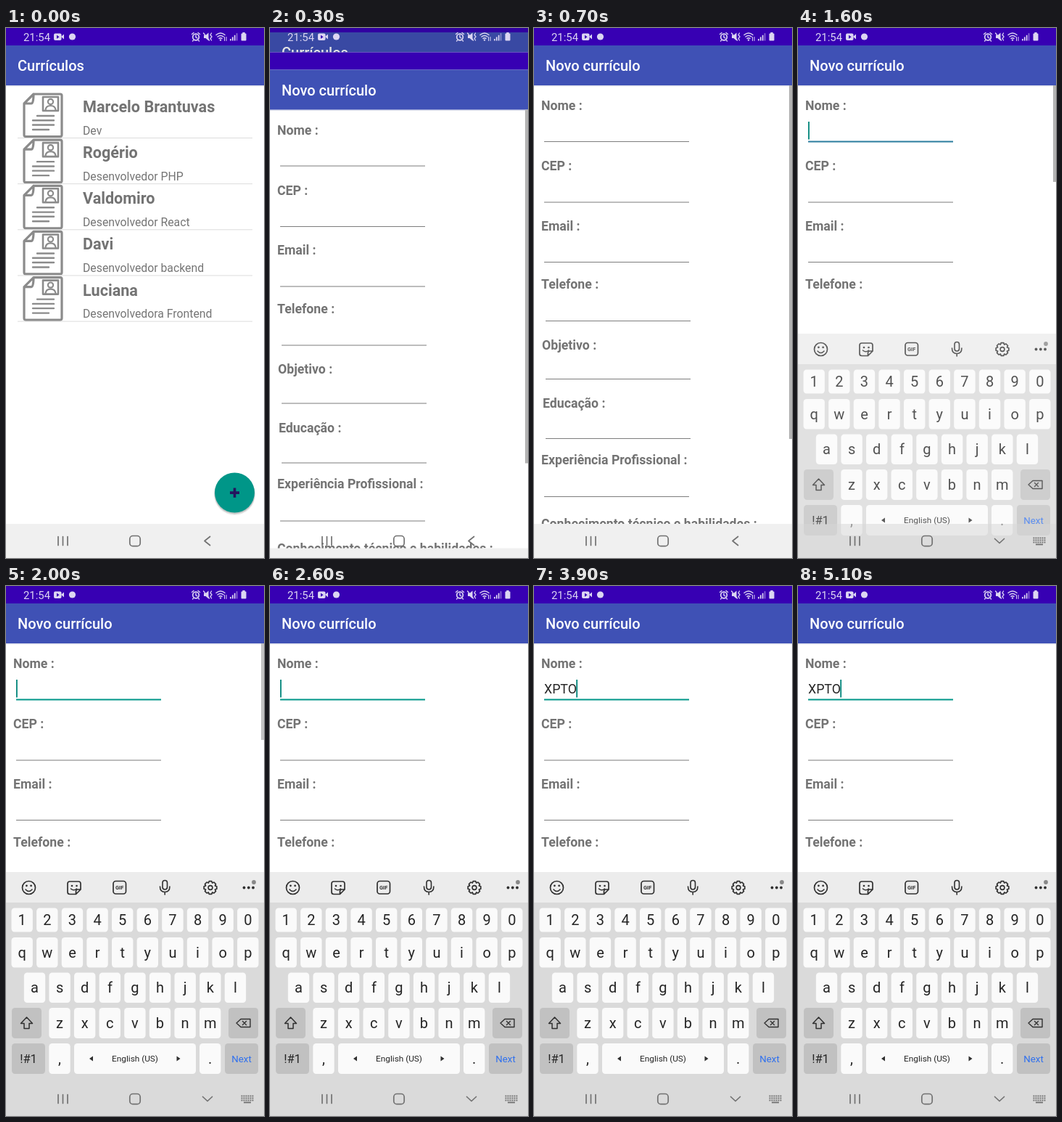
Recreate the animation shown at these times as an HTML page. Size 356 px wide and 730 px high, loop 5.3 s.

```html
<!DOCTYPE html>
<html lang="pt-BR">
<head>
<meta charset="utf-8">
<title>Currículos</title>
<style>
  html, body { margin: 0; width: 100%; height: 100%; overflow: hidden; background: #fff; }
  svg { display: block; font-family: Roboto, sans-serif; }
  .title { font-size: 20px; font-weight: 500; fill: #fff; }
  .name { font-size: 21.6px; font-weight: 700; fill: #737373; }
  .role { font-size: 15.8px; fill: #757575; }
  .label { font-size: 17.7px; font-weight: 700; fill: #737373; }
  .key { font-size: 20px; fill: #252525; text-anchor: middle; }
  .line { fill: none; stroke-linecap: round; stroke-linejoin: round; }
</style>
</head>
<body>
<svg id="stage" width="356" height="730" viewBox="0 0 356 730"></svg>
<script>
const LOOP = 5300;
const people = [
  ['Marcelo Brantuvas', 'Dev'],
  ['Rogério', 'Desenvolvedor PHP'],
  ['Valdomiro', 'Desenvolvedor React'],
  ['Davi', 'Desenvolvedor backend'],
  ['Luciana', 'Desenvolvedora Frontend']
];
// label, text x, baseline, underline x, underline y
const fields = [
  ['Nome :', 10, 113, 14, 156.5],
  ['CEP :', 10, 196, 14, 240],
  ['Email :', 10, 278.5, 14, 322.5],
  ['Telefone :', 10, 359, 16, 403.5],
  ['Objetivo :', 11, 442.5, 16, 483.5],
  ['Educação :', 12, 523, 16, 565.5],
  ['Experiência Profissional :', 10, 600.5, 14, 645.5],
  ['Conhecimento técnico e habilidades :', 10, 689, 14, 730]
];

const rect = (x, y, w, h, fill, r = 0, more = '') =>
  `<rect x="${x}" y="${y}" width="${w}" height="${h}" fill="${fill}" rx="${r}" ${more}/>`;
const text = (x, y, cls, s, more = '') => `<text x="${x}" y="${y}" class="${cls}" ${more}>${s}</text>`;
const line = (d, color, width) => `<path class="line" d="${d}" stroke="${color}" stroke-width="${width}"/>`;
const shape = (d, fill) => `<path d="${d}" fill="${fill}"/>`;
const dot = (x, y, r, fill) => `<circle cx="${x}" cy="${y}" r="${r}" fill="${fill}"/>`;
const ring = (x, y, r, color, width) =>
  `<circle cx="${x}" cy="${y}" r="${r}" fill="none" stroke="${color}" stroke-width="${width}"/>`;
const group = (id, s, more = '') => `<g id="${id}" ${more}>${s}</g>`;

const page = title =>
  rect(0, 0, 356, 770, '#fff') + rect(0, 79, 356, 1.5, '#dfe1ec') +
  rect(0, 0, 356, 24, '#3700b3') + rect(0, 24, 356, 55, '#3f51b5') +
  text(16, 59, 'title', title);
const navBack = rect(0, 683, 356, 90, '#f0f0f0');

const resume =
  line('M38 91H75Q77 91 77 93V147Q77 149.5 75 149.5H27Q25 149.5 25 147V104L38 91Q38 104 35 104H25', '#8b8b8b', 3.2) +
  line('M51 95H72V114H51Z', '#8b8b8b', 2.6) + ring(61.5, 101.5, 3.6, '#8b8b8b', 2.2) +
  line('M54.5 113Q55 107 61.5 107T68.5 113', '#8b8b8b', 2.2) +
  line('M43 121H66M37 127.3H66M37 133.5H66M37 140H59', '#8b8b8b', 2.4);

function listPage() {
  const rows = people.map(([name, role], i) =>
    `<g transform="translate(0 ${i * 63.15})">` + resume + text(106, 116, 'name', name) +
    text(106, 146.8, 'role', role) + rect(16, 151, 324, 1, '#dcdcdc') + '</g>').join('');
  const fab = dot(315.5, 642.5, 28.5, 'rgba(0,0,0,.08)') + dot(315.5, 641.5, 28, 'rgba(0,0,0,.16)') +
    dot(315.5, 640, 27.5, '#009688') + shape('M309 638.3h4.7v-4.8h3.6v4.8h4.7v3.6h-4.7v4.8h-3.6v-4.8h-4.7z', '#25145e');
  return page('Currículos') + rows + fab + navBack;
}

function formPage() {
  const rows = fields.map(([s, x, y, lx, ly]) =>
    text(x, y, 'label', s) + rect(lx, ly - .5, 200, 1, '#7d7d7d')).join('');
  return page('Novo currículo') + rows + rect(352, 79, 4, 487, '#b4b4b4', 0, 'id="bar"') + navBack;
}

function statusIcons() {
  const c = '#dcd6f2';
  return text(24, 17.5, '', '21:54', `font-size="14.9" fill="${c}"`) +
    rect(66, 7.5, 10.5, 9.5, c, 2) + shape('M76 12l4-3.5v7z', c) + shape('M70 9.8v5l3.7-2.5z', '#3700b3') +
    dot(91.5, 12, 4.6, c) +
    ring(262, 12.5, 4.3, c, 1.7) + line('M262 10v2.8l2 1.2M256.5 8.5l2.5-2M267.5 8.5l-2.5-2M258.5 17l-1 1M265.5 17l1 1', c, 1.4) +
    shape('M273 10h2.5l4-3.5v11l-4-3.5H273z', c) + line('M272.5 7l8 10M283.5 7l-1.5 2.5 2 2.5-2 2.5 1.5 2.5', c, 1.3) +
    line('M290 9.5Q296 4.5 302 9.5M292 12Q296 8.8 300 12M294 14.4Q296 13 298 14.4', c, 1.5) + dot(296, 16.6, 1.2, c) +
    line('M301.5 12.5v5M304 12.5v5', c, 1) +
    [0, 1, 2, 3].map(i => rect(309 + i * 2.9, 15 - i * 2.6, 1.7, 2.5 + i * 2.6, c, 0, i == 3 ? 'opacity=".5"' : '')).join('') +
    rect(324.5, 7.5, 7, 10, c, 1) + rect(326.3, 6, 3.4, 2, c);
}

function navIcons() {
  const c = '#727272';
  const dots = [0, 1, 2].map(r => [0, 1, 2, 3, 4, 5].map(k => rect(324.5 + k * 3, 701.5 + r * 3, 1.9, 1.9, c)).join('')).join('');
  return line('M72 700.5v12M78.5 700.5v12M85 700.5v12', c, 1.7) +
    `<rect x="170.8" y="699.5" width="14.4" height="14.2" rx="4.2" fill="none" stroke="${c}" stroke-width="1.7"/>` +
    group('back', line('M281.5 700.5l-7.5 6 7.5 6', c, 1.7)) +
    group('hide', line('M271.5 703.5l6.5 6 6.5-6', c, 1.7) + dots + rect(328, 710.5, 10, 1.8, c));
}

function keyboard() {
  const ink = '#303030', light = '#fafafa', gray = '#c1c1c1', step = 34.62;
  const row = (chars, x, y, h) => [...chars].map((ch, i) =>
    rect(x + i * step - 14.7, y, 29.4, h, light, 4.5) + text(x + i * step, y + h / 2 + 7.2, 'key', ch)).join('');
  const teeth = [0, 1, 2, 3, 4, 5, 6, 7].map(i => {
    const a = i * Math.PI / 4, p = (r, d) => `${282 + r * Math.cos(a + d)} ${415.5 + r * Math.sin(a + d)}`;
    return `${i ? 'L' : 'M'}${p(7, -.39)}L${p(9, -.2)}L${p(9, .2)}L${p(7, .39)}`;
  }).join('') + 'Z';
  const tools =
    ring(31.5, 415.5, 9, ink, 1.7) + dot(28.4, 412.8, 1.4, ink) + dot(34.6, 412.8, 1.4, ink) + line('M27 418q4.5 5 9 0', ink, 1.6) +
    line('M88 407h12q3 0 3 3v8l-6.500 6.500H88q-3 0-3-3v-11.500q0-3 3-3M103 418h-4q-2.500 0-2.500 2.500v4', ink, 1.7) +
    dot(91, 413, 1.3, ink) + dot(97.5, 413, 1.3, ink) + line('M89.500 417q4 3.500 8 0', ink, 1.5) +
    `<rect x="148" y="406.500" width="17.500" height="17.500" rx="3.500" fill="none" stroke="${ink}" stroke-width="1.7"/>` +
    text(156.7, 418, '', 'GIF', `font-size="7.4" font-weight="700" text-anchor="middle" fill="${ink}"`) +
    `<rect x="216" y="405.500" width="6.500" height="12.500" rx="3.200" fill="none" stroke="${ink}" stroke-width="1.6"/>` +
    line('M212.500 414q0 7.500 6.700 7.500t6.700-7.500M219.200 421.500v3.500', ink, 1.6) +
    line(teeth, ink, 1.7) + ring(282, 415.5, 2.9, ink, 1.6) +
    dot(328.5, 415.5, 1.9, ink) + dot(334.8, 415.5, 1.9, ink) + dot(341, 415.5, 1.9, ink) + dot(342, 408, 2.9, '#888');
  const special = rect(8, 581, 41, 42, gray, 4.5) + line('M28.500 594l8 8.500h-4.500v7h-7v-7h-4.500z', ink, 1.5) +
    rect(307, 581, 41, 42, gray, 4.5) + line('M324 596.500h13v11h-13l-6-5.500zM326.500 599.500l5 5M331.500 599.500l-5 5', ink, 1.4) +
    rect(8, 630, 46, 42, gray, 4.5) + text(31, 657, 'key', '!#1', 'style="font-size:16.5px"') +
    rect(59.3, 630, 29.4, 42, light, 4.5) + text(74, 658, 'key', ',') +
    rect(94, 630, 168, 42, light, 4.5) + text(178, 655.3, 'key', 'English (US)', 'style="font-size:11.8px"') +
    shape('M115 651l5-3.500v7zM240.500 651l-5-3.500v7z', ink) +
    rect(267, 630, 29.4, 42, light, 4.5) + text(281.7, 658, 'key', '.') +
    rect(302, 630, 46, 42, gray, 4.5) + text(325, 655.8, 'key', 'Next', 'style="font-size:13.3px;fill:#2f70ee"');
  return rect(0, 394, 356, 336, '#dadada') + rect(0, 394, 356, 42, '#ececec') + tools +
    row('1234567890', 22.2, 443.5, 33) + row('qwertyuiop', 22.2, 484, 41.5) +
    row('asdfghjkl', 39.5, 532.5, 41.5) + row('zxcvbnm', 74, 581, 42) + special;
}

const $ = id => document.getElementById(id);
$('stage').innerHTML =
  '<clipPath id="reveal"><rect id="opening" width="356" height="730"/></clipPath>' +
  group('list', listPage()) + rect(0, 0, 356, 730, '#000', 0, 'id="dim"') +
  group('window', group('form', formPage()), 'clip-path="url(#reveal)"') +
  group('edit',
    rect(14, 155.5, 200, 2, '#009688', 0, 'id="focus"') +
    text(14, 148, '', '', 'id="typed" font-size="17.8" fill="#252525"') +
    rect(14, 129, 1.8, 24.5, '#00857a', 0, 'id="cursor"') +
    rect(0, 394, 356, 289, '#fff') + group('keys', keyboard()) +
    rect(0, 683, 356, 47, '#dadada', 0, 'id="strip"')) +
  group('status', statusIcons()) + group('nav', navIcons());

const set = (id, name, value) => $(id).setAttribute(name, value);
const show = (id, on) => set(id, 'visibility', on ? 'visible' : 'hidden');
const clamp = v => Math.max(0, Math.min(1, v));
const shift = (id, y) => set(id, 'transform', `translate(0 ${y})`);

function draw(t) {
  // new page: revealed from the bottom, then settles upwards
  const open = clamp((t - 50) / 250);
  shift('list', -18 * clamp((t - 100) / 200));
  set('dim', 'opacity', .1 * open * (t >= 100));
  show('window', t >= 100);
  set('opening', 'y', 730 * (1 - open * open));
  shift('form', 33.5 * clamp((700 - t) / 400) ** 2.5);

  const editing = t >= 1500;
  show('edit', editing);
  show('cursor', editing && !(t >= 2100 && t < 2600 || t >= 3100 && t < 3200 || t >= 4500 && t < 5100));
  show('back', !editing);
  show('hide', editing);
  set('bar', 'height', editing ? 133 : 487);
  set('bar', 'opacity', clamp((2400 - t) / 500));

  const fade = clamp((t - 1450) / 190);
  shift('keys', 60 * (1 - clamp((t - 1480) / 320)) ** 1.7);
  set('keys', 'opacity', fade);
  set('strip', 'opacity', fade * .65 * (t < 1800));
  set('focus', 'fill', t < 1700 ? '#2a7c9e' : '#009688');

  const typed = [3200, 3400, 3600, 3900].filter(at => t >= at).length;
  $('typed').textContent = 'XPTO'.slice(0, typed);
  set('cursor', 'x', 14 + (typed && $('typed').getComputedTextLength() - .7));
  if (!editing) $('cursor').removeAttribute('visibility');
  if (!editing) show('cursor', false);
}

const start = performance.now();
function tick() {
  draw(Math.floor((performance.now() - start) % LOOP / 100) * 100);
  requestAnimationFrame(tick);
}
tick();
</script>
</body>
</html>
```
